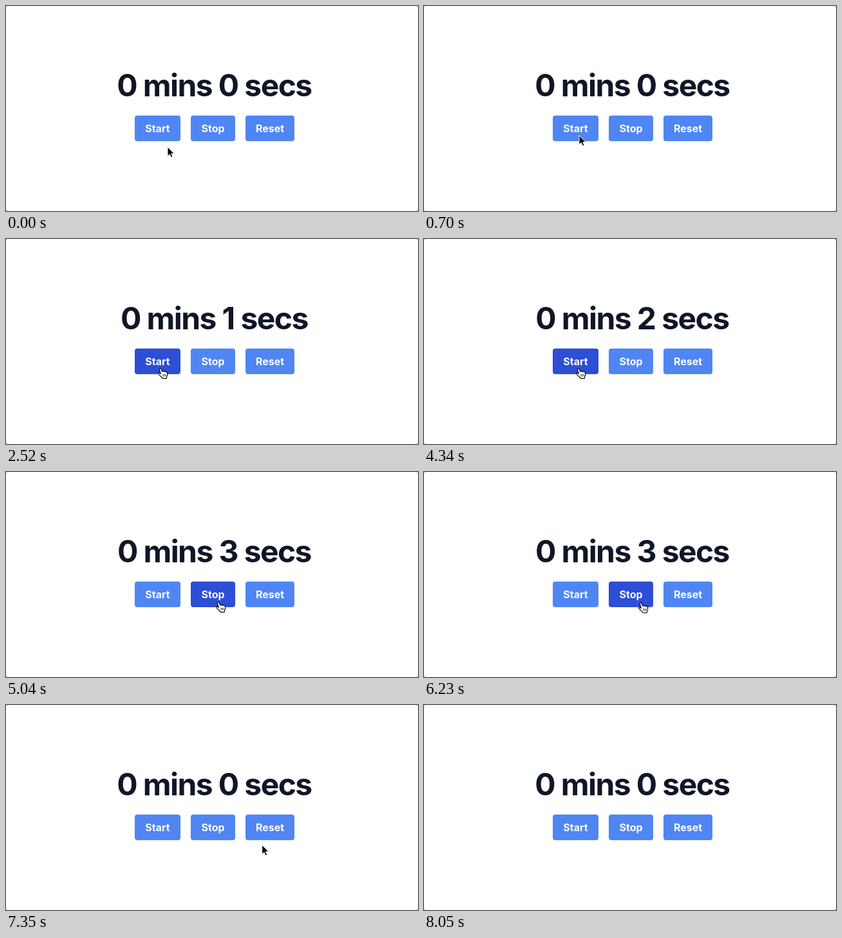
An HTML page for the animation above (8190 ms loop, 640 by 320 pixels).

```html
<!DOCTYPE html>
<html lang="en">
<head>
<meta charset="utf-8">
<title>Stopwatch</title>
<style>
  html, body { margin: 0; width: 100%; height: 100%; overflow: hidden; background: #fff; }
  svg { display: block; width: 640px; height: 320px; font-family: Inter, sans-serif; font-weight: 700; text-anchor: middle; }
  #clock { font-size: 48px; letter-spacing: -0.033em; fill: #101628; }
  .button { fill: #4f86f3; }
  .button.hover { fill: #2d4ed5; }
  .button + text { font-size: 16px; fill: #fff; }
  #ring, #hand { fill: none; }
</style>
</head>
<body>
<svg viewBox="0 0 640 320">
  <path d="M0 0h2L0 2zM640 0h-2l2 2zM0 320h2l-2-2zM640 320h-2l2-2z" fill="#aaa"/>
  <text id="clock" x="323.4" y="141"></text>
  <g id="buttons"></g>
  <g id="ring">
    <circle r="29" stroke="#fff" stroke-width="5"/>
    <circle r="29" stroke="#000" stroke-width="3"/>
  </g>
  <path id="arrow" d="M0 0V14.5L3.3 11.4 5.5 16.4 8 15.3 5.8 10.4H10.3Z" stroke="#fff"/>
  <g id="hand" stroke="#000" stroke-linejoin="round">
    <path fill="#fff" stroke-width="1.1" d="M-2.6 2C-3.3 .2-.9-.8 0 1L1.9 5.2C2.4 3.9 4.2 4 4.6 5.3C5.2 4.3 6.9 4.5 7.2 5.8C8.1 5 9.4 5.6 9.6 7C10 9.5 9.8 11.5 8.6 13.2L8.4 15.6H2.4C1 13.4-1.6 12-4 9C-5 7.4-3.2 6.6-2 7.6L-.6 8.6Z"/>
    <path stroke-width=".8" d="M2.6 9l.7 3.7M4.8 8.9l.4 3.7M6.9 8.8l.2 3.6"/>
  </g>
</svg>
<script>
const LOOP = 8190, STEP = 70;
const el = id => document.getElementById(id);
const labels = [["Start", 200, 71], ["Stop", 287, 69], ["Reset", 372, 76]];

el("buttons").innerHTML = labels.map(([label, x, w]) =>
  `<rect class="button" x="${x}" y="171" width="${w}" height="40" rx="4"/>
   <text x="${x + w / 2}" y="197">${label}</text>`).join("");
const buttons = [...document.querySelectorAll(".button")];

// Pointer moves: start, end, target x, target y, sag of the path
const moves = [
  [0, 280, 254, 204, 0],
  [490, 700, 241, 202, 0],
  [4480, 5040, 331, 203, 5],
  [6160, 6510, 398, 203, 2],
  [7210, 7840, 396, 326, 0],
];
const clicks = [[1330, 1470, 241, 201], [5390, 5460, 331, 202], [6930, 7070, 399, 202]];
const ticks = [2520, 3500, 4550];
const resetAt = 7070;

function pointer(t) {
  let x = 251, y = 220;
  for (const [start, end, toX, toY, sag] of moves) {
    if (t < start) break;
    const p = Math.min(1, (t - start) / (end - start));
    const eased = p * p * (3 - 2 * p);
    x += (toX - x) * eased;
    y += (toY - y) * eased + sag * Math.sin(Math.PI * p);
  }
  return [x, y];
}

const place = (node, x, y) => node.setAttribute("transform", `translate(${x} ${y})`);
const show = (node, on) => node.setAttribute("visibility", on ? "visible" : "hidden");

function draw(now) {
  const t = Math.floor(now % LOOP / STEP) * STEP;
  const seconds = t < resetAt ? ticks.filter(tick => t >= tick).length : 0;
  el("clock").textContent = `0 mins ${seconds} secs`;

  const [x, y] = pointer(t);
  const over = t < 910 || y > 211 ? -1
    : labels.findIndex(([, left, width]) => x >= left && x <= left + width);
  buttons.forEach((button, i) => button.classList.toggle("hover", i === over));

  place(el("arrow"), x, y);
  place(el("hand"), x, y);
  show(el("arrow"), over < 0);
  show(el("hand"), over >= 0);

  const click = clicks.find(([start, end]) => t >= start && t < end);
  show(el("ring"), click);
  if (click) place(el("ring"), click[2], click[3]);
  requestAnimationFrame(draw);
}
requestAnimationFrame(draw);
</script>
</body>
</html>
```
